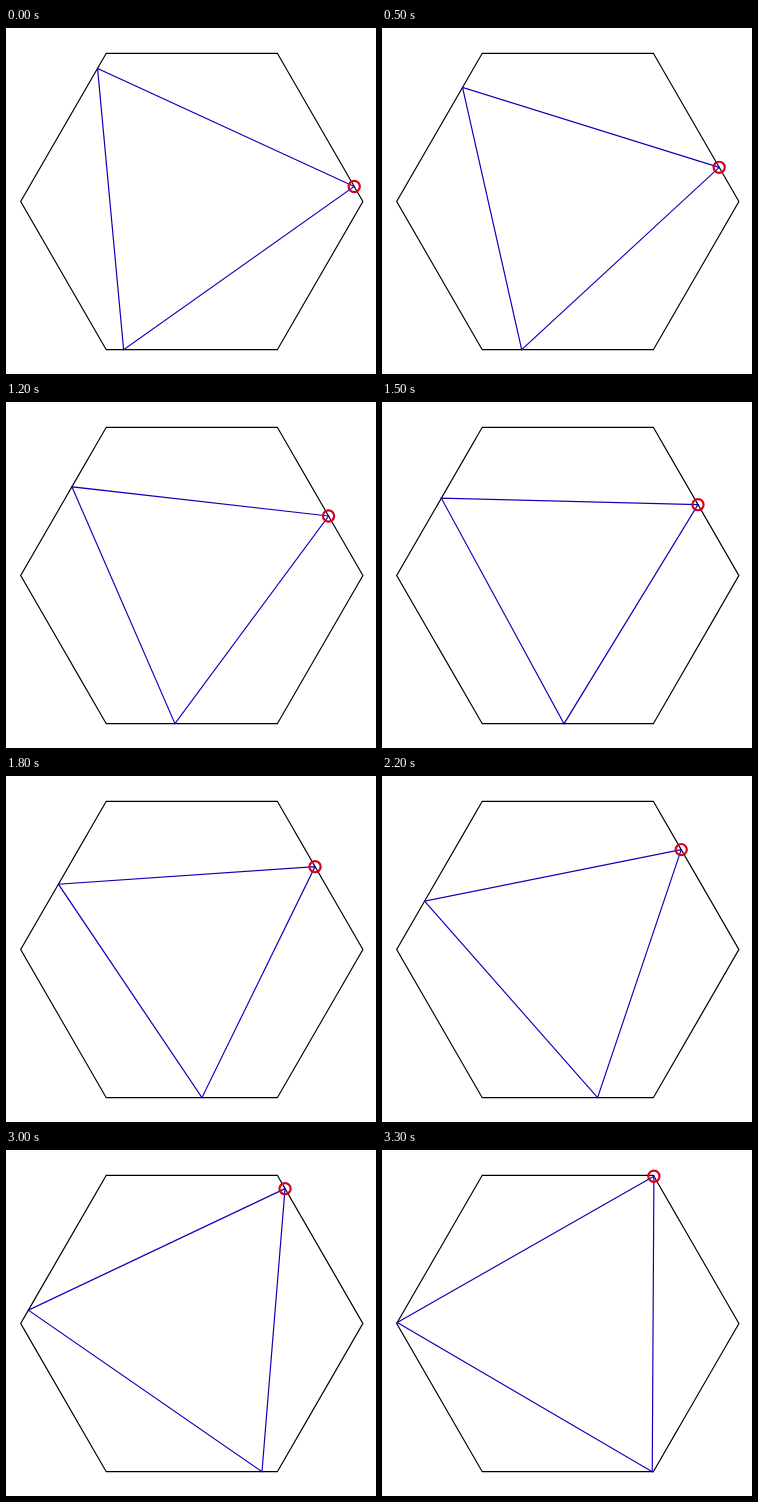
Recreate the animation shown at these times as an HTML page. Size 370 by 346 pixels, loop 3.4 s.

```html
<!DOCTYPE html>
<html lang="en">
<head>
<meta charset="utf-8">
<title>Triangle turning in a hexagon</title>
<style>
  html, body { margin: 0; width: 100%; height: 100%; overflow: hidden; background: #fff; }
  svg { display: block; }
</style>
</head>
<body>
<svg width="370" height="346" viewBox="0 0 370 346" fill="none" stroke-width="1.2">
  <polygon id="hexagon" stroke="#000"/>
  <polygon id="triangle" stroke="#1400b8"/>
  <circle id="marker" r="5.6" stroke="#d4001c" stroke-width="2.2"/>
</svg>
<script>
const STEP = 100, STEPS = 34;
const CX = 185.8, CY = 173.5, RADIUS = 171.1;

const [hexagon, triangle, marker] = ['hexagon', 'triangle', 'marker'].map(id => document.getElementById(id));
const mix = (a, b, t) => a + (b - a) * t;

// Corners run counter-clockwise from the right.
function corner(i) {
  const angle = i * Math.PI / 3;
  return [CX + RADIUS * Math.cos(angle), CY - RADIUS * Math.sin(angle)];
}

function onEdge(i, part) {
  const end = corner(i + 1);
  return corner(i).map((c, axis) => mix(c, end[axis], part));
}

// Nearly steady travel that lags slightly in the middle.
function travelled(u) {
  return mix(0.1015, 0.9935, u - 0.033 * Math.sin(Math.PI * u) ** 2);
}

function draw(now) {
  const step = Math.floor(now / STEP) % STEPS;
  const part = travelled(step / (STEPS - 1));
  const points = [0, 2, 4].map(i => onEdge(i, part));
  triangle.setAttribute('points', points.join(' '));
  marker.setAttribute('cx', points[0][0]);
  marker.setAttribute('cy', points[0][1]);
}

hexagon.setAttribute('points', Array.from({ length: 6 }, (_, i) => corner(i)).join(' '));
const start = performance.now();
function tick() {
  draw(performance.now() - start);
  requestAnimationFrame(tick);
}
tick();
</script>
</body>
</html>
```
